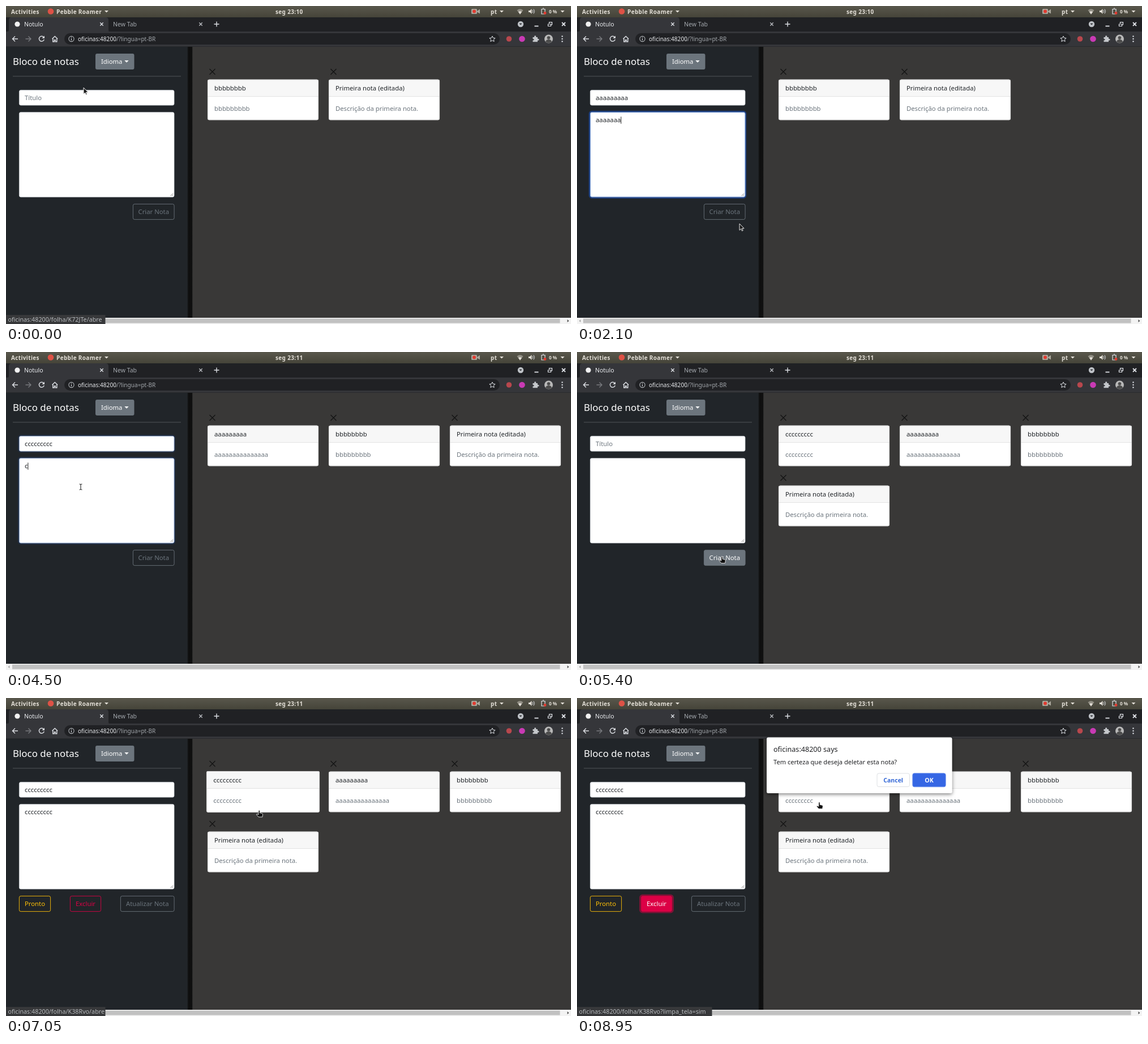
Recreate the animation shown at these times as an HTML page. Size 998 by 561 pixels, loop 9000 ms.

```html
<!DOCTYPE html>
<html lang="pt">
<head>
<meta charset="utf-8">
<title>Bloco de notas</title>
<style>
html, body { margin: 0; width: 100%; height: 100%; overflow: hidden; background: #393938; }
svg { display: block; width: 100vw; height: 100vh; }
text { font-family: "Noto Sans", "Open Sans", sans-serif; font-size: 11.3px; white-space: pre; }
.panel { font-size: 10px; font-weight: 600; letter-spacing: .35px; fill: #e4e0d8; }
.ui { font-size: 10.5px; }
.line { fill: none; stroke: #dee1e6; stroke-width: 1.4; }
</style>
</head>
<body>
<svg viewBox="0 0 998 561" preserveAspectRatio="none">
  <defs>
    <linearGradient id="top" x2="0" y2="1"><stop stop-color="#59574c"/><stop offset="1" stop-color="#454439"/></linearGradient>
    <linearGradient id="edge"><stop stop-color="#181a1c"/><stop offset=".25" stop-color="#0e0e0e"/><stop offset="1" stop-color="#111"/></linearGradient>
    <filter id="shade" x="-10%" y="-20%" width="120%" height="150%"><feDropShadow dx="0" dy="2" stdDeviation="3" flood-opacity=".5"/></filter>
  </defs>
  <g id="chrome"></g>
  <g id="page"></g>
</svg>
<script>
const LOOP = 9000, STEP = 50;
const HOST = 'oficinas:48200';
const INK = '#212529', GREY = '#6c757d', RED = '#dc0045';

const clamp = v => Math.max(0, Math.min(1, v));
const ramp = (t, from, len = 150) => clamp((t - from) / len);
const pulse = (t, on, off) => ramp(t, on) - ramp(t, off);
const inside = (p, x, y, w, h) => p.x >= x && p.x <= x + w && p.y >= y && p.y <= y + h;
const rect = (x, y, w, h, fill, more = '') =>
  `<rect x="${x}" y="${y}" width="${w}" height="${h}" fill="${fill}" ${more}/>`;
const text = (x, y, s, fill, more = '') => `<text x="${x}" y="${y}" fill="${fill}" ${more}>${s}</text>`;
const line = (d, more = '') => `<path class="line" d="${d}" ${more}/>`;
const fill = (d, color, more = '') => `<path d="${d}" fill="${color}" ${more}/>`;
const disc = (x, y, r, color, more = '') => `<circle cx="${x}" cy="${y}" r="${r}" fill="${color}" ${more}/>`;
const cross = (x, y, r) => `M${x - r} ${y - r}l${2 * r} ${2 * r}m0 ${-2 * r}l${-2 * r} ${2 * r}`;
const caretDown = (x, y, w, color) => fill(`M${x - w} ${y}h${2 * w}l${-w} ${w}z`, color);

function drawChrome() {
  const pale = '#e4e0d8';
  return [
    // desktop bar
    rect(0, 0, 998, 20, 'url(#top)'),
    text(9, 13.5, 'Activities', pale, 'class="panel"'),
    disc(79, 9.5, 5.3, '#de5246'),
    text(89, 13.5, 'Pebble Roamer', pale, 'class="panel"'),
    caretDown(177.5, 8, 3.5, pale),
    rect(822, 5, 10, 9, '#aaa79c', 'rx="1.5"'), fill('M832 9l5-3.5v8l-5-3z', '#aaa79c'), disc(827, 9.5, 3, '#e23b30'),
    text(856, 13.5, 'pt', pale, 'class="panel"'), caretDown(875.5, 8, 3.5, pale),
    fill('M902.5 7.5q5.5-4.5 11 0l-5.5 7.5z', pale, 'opacity=".45"'),
    fill('M905 10.5q3-2.3 6 0l-3 4z', pale),
    fill('M923 8h2.5l3-3v9l-3-3H923z', pale),
    line('M930 7q2 2.5 0 5m1.8-6.5q3.2 4 0 8', 'style="stroke-width:1"'),
    line('M946 5.5h6v8.5h-6zM948 4h2', 'style="stroke-width:1.2"'), disc(952, 12.5, 2.4, '#e23b30'),
    text(959, 12.5, '0 %', pale, 'style="font-size:8.2px;font-weight:600"'), caretDown(983, 8, 3.5, pale),
    // tab strip
    rect(0, 20, 998, 26, '#202124'),
    fill('M1 46q4 0 4-4v-17q0-5 5-5h166q5 0 5 5v17q0 4 4 4z', '#35363a'),
    disc(20, 32, 4.6, '#f2f2f2'),
    text(32, 36, 'Notulo', '#e8eaed', 'class="ui"'),
    text(189, 36, 'New Tab', '#a3a8ad', 'class="ui"'),
    line(cross(169, 32, 2.7)), line(cross(344, 32, 2.7), 'opacity=".8"'),
    line('M367.5 32h9m-4.5-4.5v9'),
    disc(909, 32, 5.2, '#bdc1c6'), caretDown(909, 30.8, 2.5, '#202124'),
    line('M933.5 35.5h7', 'style="stroke-width:1.8"'),
    line('M957.5 32h5v3.5h-5zM959.5 31v-2.3h5v4.3h-2', 'style="stroke-width:1.2"'),
    line(cross(985, 32, 3), 'style="stroke-width:1.8"'),
    // toolbar
    rect(0, 45, 998, 27, '#35363a'),
    rect(103, 48, 769, 20, '#202124', 'rx="10"'),
    line('M21 58H11.5m4.5-4.5L11.5 58l4.5 4.5'),
    line('M34.5 58H44m-4.5-4.5L44 58l-4.5 4.5', 'opacity=".4"'),
    line('M66.5 55a4.5 4.5 0 1 0 .8 4'), fill('M68 52.5v4.5h-4.5z', '#dee1e6'),
    line('M81.5 58l4.8-4.5 4.8 4.5m-8.3-1v6h2.5v-3h2v3h2.5v-6'),
    disc(115.5, 58, 4.6, 'none', 'stroke="#b4b8bc" stroke-width="1.1"'),
    line('M115.5 57.3v3.2m0-5.4v1', 'style="stroke-width:1.1"'),
    text(127, 61.5, `${HOST}<tspan fill="#a0a5aa">/?lingua=pt-BR</tspan>`, '#e8eaed', 'style="font-size:10.1px"'),
    line('M859 53l1.5 3.3 3.6.4-2.7 2.4.8 3.5-3.2-1.8-3.2 1.8.8-3.5-2.7-2.4 3.6-.4z', 'style="stroke-width:1"'),
    disc(888.5, 58, 4.8, '#b8474d'), disc(911.5, 58, 5.3, '#c93ab5'),
    fill('M930.5 55h2.7q-.4-2.8 1.5-2.8t1.5 2.8h2.8v2.8q2.6-.4 2.6 1.5t-2.6 1.5v2.5h-8.5v-2.7q2.2.2 2.2-1.3t-2.2-1.3z', '#c4c7cb'),
    disc(958.5, 58, 7.5, '#b9b9b9'), disc(958.5, 56, 2.8, '#4c4c4c'), fill('M953 63q1-4 5.5-4t5.5 4q-5.5 4.5-11 0z', '#4c4c4c'),
    [53.5, 58, 62.5].map(y => disc(982.5, y, 1.2, '#dee1e6')).join(''),
    // page frame
    rect(0, 71.3, 998, .8, '#242528'),
    rect(0, 72, 321, 478, INK), rect(320.5, 72, 9, 478, 'url(#edge)'), rect(329.5, 72, 668.5, 478, '#393837'),
    text(12, 104, 'Bloco de notas', '#fff', 'style="font-size:16.9px"'),
    rect(158, 84, 68.5, 28, GREY, 'rx="3"'),
    text(168, 102, 'Idioma', '#fff'), caretDown(213, 96, 3.7, '#fff'),
    rect(12, 123.5, 297, .9, '#565a5d'),
    rect(0, 550, 998, 11, '#f3f3f3'), rect(11, 551.5, 967.5, 8, '#c1c1c1'),
    fill('M3.5 555.5l3-2.5v5z', '#a8a8a8'), fill('M994.5 555.5l-3-2.5v5z', '#505050')
  ].join('');
}

// pointer stops: time, x, y
const stops = [
  [0, 137, 144], [200, 138, 160], [950, 138, 160], [1150, 145, 235], [1300, 145, 235],
  [1750, 287, 384], [2250, 287, 384], [2600, 262, 362], [2800, 262, 362], [3250, 139, 160],
  [4150, 139, 160], [4380, 132, 238], [4950, 132, 238], [5250, 256, 361], [5600, 256, 361],
  [6150, 497, 171], [6800, 497, 171], [7850, 149, 363], [8600, 149, 363], [8950, 428, 184]
];
function pointer(t) {
  const i = stops.findIndex(s => s[0] > t);
  if (i < 0) return { x: 428, y: 184 };
  const [t0, x0, y0] = stops[i - 1], [t1, x1, y1] = stops[i];
  const k = (t - t0) / (t1 - t0), e = k * k * (3 - 2 * k);
  return { x: x0 + (x1 - x0) * e, y: y0 + (y1 - y0) * e };
}

const typed = (t, ch, start, gap, max) =>
  ch.repeat(Math.max(0, Math.min(max, Math.floor((t - start) / gap) + 1)));

function formText(t) {
  if (t < 2750) return [typed(t, 'a', 350, 60, 9), typed(t, 'a', 1690, 60, 15)];
  if (t < 5400) return [typed(t, 'c', 3600, 60, 9), typed(t, 'c', 4480, 55, 9)];
  return t < 6650 ? ['', ''] : ['ccccccccc', 'ccccccccc'];
}

const pen = document.createElement('canvas').getContext('2d');
function widthOf(s) {
  pen.font = '11.3px "Noto Sans", "Open Sans", sans-serif';
  return pen.measureText(s).width;
}

function field(y, h, value, base, focus, caret, hint) {
  const glow = focus * focus;
  let out = '';
  if (glow > 0) out += rect(21.9, y - 1.1, 276.2, h + 2.2, 'none',
    `rx="4.2" stroke="#1a4cb0" stroke-width="2.4" opacity="${glow * .6}"`);
  out += rect(23.4, y + .4, 273.6, h - .8, '#fff', 'rx="2.8" stroke="#ced4da" stroke-width=".8"');
  if (glow > 0) out += rect(23.4, y + .4, 273.6, h - .8, 'none',
    `rx="2.8" stroke="#4a7bd4" stroke-width=".8" opacity="${focus}"`);
  out += text(33, base, value || hint, value ? INK : GREY);
  if (caret) out += rect(33 + widthOf(value), base - 10, .9, 12.5, '#111');
  return out;
}

function button(x, w, label, color, hover) {
  return rect(x + .4, 349.4, w - .8, 27.2, color, `rx="2.8" stroke="${color}" stroke-width=".9" fill-opacity="${hover}"`) +
    text(x + w / 2, 367, label, hover > .5 ? '#fff' : color, 'text-anchor="middle"');
}

const notes = {
  a: ['aaaaaaaaa', 'aaaaaaaaaaaaaaa'],
  b: ['bbbbbbbb', 'bbbbbbbbb'],
  c: ['ccccccccc', 'ccccccccc'],
  p: ['Primeira nota (editada)', 'Descrição da primeira nota.']
};
const cardPos = i => ({ x: 356 + i % 3 * 214, y: 129.8 + Math.floor(i / 3) * 106 });

function card(key, i, grow) {
  const { x, y } = cardPos(i), [title, body] = notes[key];
  const cx = x + 98, cy = y + 36;
  return `<path d="${cross(x + 8.5, y - 13.8, 5)}" stroke="#131313" stroke-width="1.2"/>` +
    `<g transform="translate(${cx} ${cy}) scale(${1 + grow * .02}) translate(${-cx} ${-cy})">` +
    rect(x, y, 196, 71.4, '#fff', 'rx="3"') +
    fill(`M${x} ${y + 29.8}v-26.8q0-3 3-3h190q3 0 3 3v26.8z`, '#f7f7f7') +
    rect(x, y + 29.4, 196, .8, '#dcdcdc') +
    rect(x + .35, y + .35, 195.3, 70.7, 'none', 'rx="2.7" stroke="#c9c9c9" stroke-width=".7"') +
    text(x + 12, y + 19.2, title, INK) + text(x + 12, y + 55.2, body, GREY) + '</g>';
}

function status(t) {
  const bar = (w, path) => rect(0, 545, w, 16, '#37383a') +
    text(3.5, 556.5, HOST + path, '#b9bcbf', 'style="font-size:10.75px"');
  if (t < 300) return bar(175.5, '/folha/K72JTe/abre');
  if (t >= 6250 && t < 7150) return bar(175.5, '/folha/K38Rvo/abre');
  if (t >= 8100) return bar(238.5, '/folha/K38Rvo?limpa_tela=sim');
  return '';
}

function dialog() {
  return rect(335, 69.5, 327.5, 98.5, '#fff', 'rx="3" filter="url(#shade)"') +
    text(347, 94.5, HOST + ' says', '#202124', 'style="font-size:12.6px"') +
    text(347, 117.3, 'Tem certeza que deseja deletar esta nota?', '#202124', 'style="font-size:11.1px"') +
    rect(530, 133, 57.5, 23.5, '#fff', 'rx="3" stroke="#dadce0" stroke-width=".9"') +
    text(558.7, 148.5, 'Cancel', '#3367d6', 'text-anchor="middle" style="font-size:10.5px;font-weight:600"') +
    rect(592.8, 132.8, 58.4, 24, '#3566e4', 'rx="3" stroke="#6c92ee" stroke-width=".9"') +
    text(622, 148.5, 'OK', '#fff', 'text-anchor="middle" style="font-size:10.5px;font-weight:600"');
}

function cursor(p, kind) {
  const shapes = {
    arrow: '<path d="M0 0V11.5L2.7 9 4.4 12.8 6.2 12 4.5 8.3H8Z" fill="#1a1a1a" stroke="#fff" stroke-width=".9"/>',
    beam: '<path d="M-2.5-5q2 0 2.5 1 .5-1 2.5-1M0-4V4M-2.5 5q2 0 2.5-1 .5 1 2.5 1" fill="none" stroke="#333" stroke-width="1.2"/>',
    hand: '<path d="M-1.2 1Q-1.2-.5 0-.5T1.2 1V4.2L5.2 5.2Q6.5 5.7 6.3 7L5.6 11.5H-1L-4.6 7.6Q-5 5.8-3.2 6.3L-1.2 7.3Z" fill="#111" stroke="#fff" stroke-width=".8"/>'
  };
  return `<g transform="translate(${p.x} ${p.y})">${shapes[kind]}</g>`;
}

function scene(t) {
  const p = pointer(t);
  const list = t < 2750 ? 'bp' : t < 5400 ? 'abp' : 'cabp';
  const editing = t >= 6650, asking = t >= 8650;
  const [title, body] = formText(t);
  const titleFocus = pulse(t, 220, 1180) + pulse(t, 3320, 4420);
  const bodyFocus = pulse(t, 1180, 2600) + pulse(t, 4420, 5250);
  const inTitle = (t >= 220 && t < 1180) || (t >= 3320 && t < 4420);
  const inBody = (t >= 1180 && t < 2600) || (t >= 4420 && t < 5250);

  let out = text(476, 13.5, t < 2850 ? 'seg 23:10' : 'seg 23:11', '#e4e0d8', 'class="panel"');
  out += field(148, 27.5, title, 165.5, titleFocus, inTitle, 'Título');
  out += field(187, 150.4, body, 205.2, bodyFocus, inBody, '');
  out += '<path d="M290.5 335l4.5-4.5m-2 4.5l2-2" stroke="#777" stroke-width=".8"/>';

  if (editing) {
    const ring = ramp(t, 8570);
    if (ring) out += rect(111.5, 348, 58, 30, 'none', `rx="4" stroke="${RED}" stroke-width="2.8" opacity="${ring * .5}"`);
    out += button(23, 56, 'Pronto', '#ffc107', 0);
    out += button(113, 55, 'Excluir', RED, clamp((t - 7730) / 300));
    out += button(202, 95.5, 'Atualizar Nota', GREY, 0);
  } else {
    out += button(224, 73.5, 'Criar Nota', GREY, pulse(t, 2520, 2890) + pulse(t, 5180, 5700));
  }

  let onCard = false;
  [...list].forEach((key, i) => {
    const { x, y } = cardPos(i);
    onCard = onCard || inside(p, x, y, 196, 71.4);
    out += card(key, i, key === 'c' ? pulse(t, 6125, 7100) : 0);
  });
  out += status(t);
  if (asking) out += dialog();

  const onButton = editing ? inside(p, 113, 349, 55, 28) : inside(p, 224, 349, 73, 28);
  const onField = inside(p, 23, 148, 274, 28) || inside(p, 23, 187, 274, 150);
  return out + cursor(p, asking || onCard || onButton ? 'hand' : onField ? 'beam' : 'arrow');
}

document.getElementById('chrome').innerHTML = drawChrome();
const page = document.getElementById('page');
const begin = performance.now();
let last = -1;
function tick() {
  const t = Math.floor((performance.now() - begin) % LOOP / STEP) * STEP;
  if (t !== last) page.innerHTML = scene(last = t);
  requestAnimationFrame(tick);
}
tick();
</script>
</body>
</html>
```
